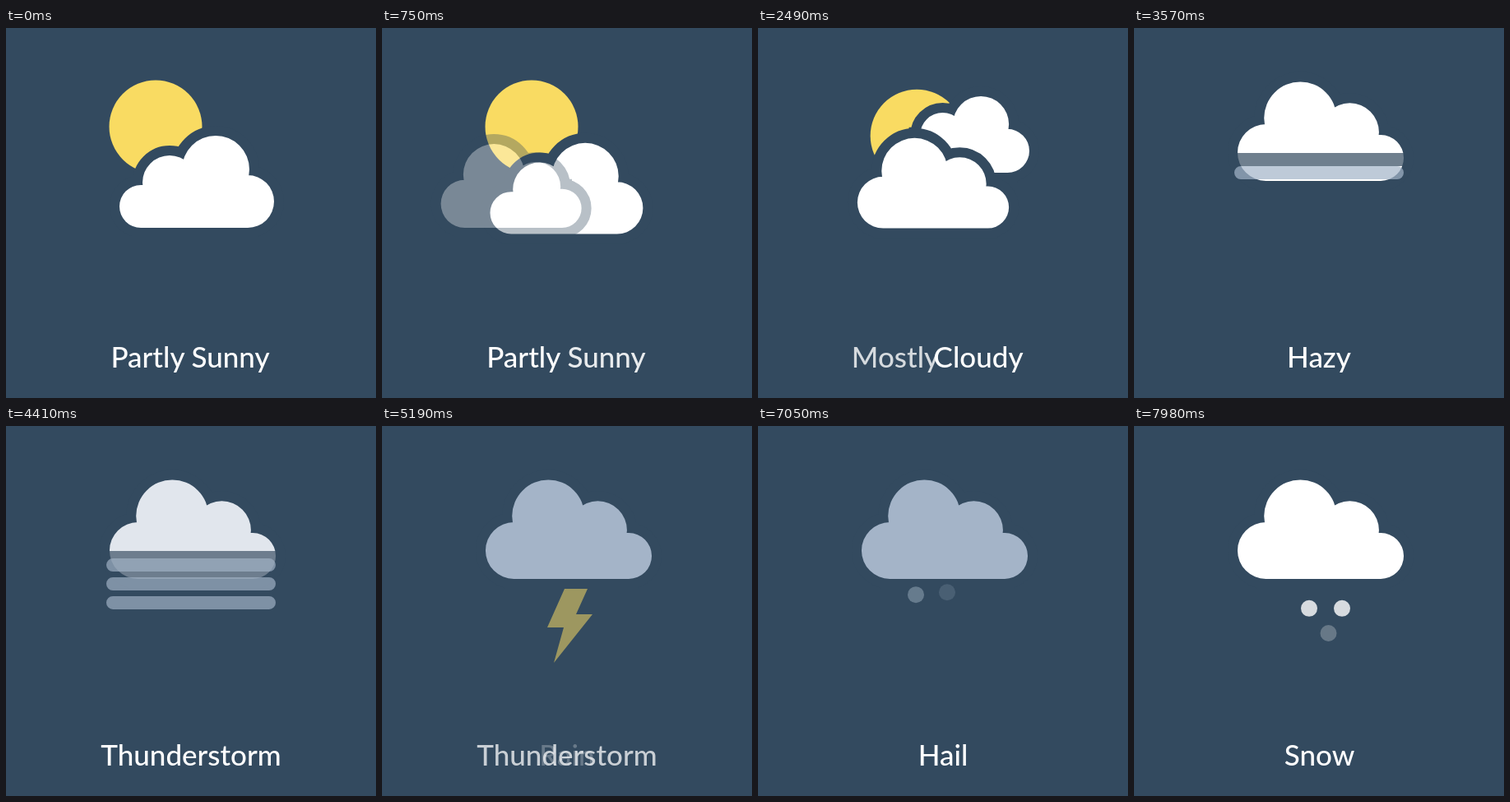
Recreate the animation shown at these times as an HTML page with a canvas. Size 450x450 px, loop 8000 ms.

```html
<!DOCTYPE html>
<html lang="en">
<head>
<meta charset="utf-8">
<title>Weather</title>
<style>
html, body { margin: 0; width: 100%; height: 100%; overflow: hidden; background: #334a5f; }
canvas { display: block; }
</style>
</head>
<body>
<canvas id="stage" width="450" height="450"></canvas>
<script>
const stage = document.getElementById('stage').getContext('2d');
const layer = stage.canvas.cloneNode().getContext('2d');
const LOOP = 8000, BG = '#334a5f', SUN = '#f9db62', RAIN = '#6bbbee';
const WHITE = [255, 255, 255], GREY = [164, 180, 200];

const ramp = (t, start, dur) => Math.min(1, Math.max(0, (t - start) / dur));
const cubic = p => p < .5 ? 4 * p ** 3 : 1 - 4 * (1 - p) ** 3;
const back = (p, s) => {
  const half = u => u * u * ((s + 1) * u - s) / 2;
  return p < .5 ? half(2 * p) : 1 - half(2 - 2 * p);
};
const mix = (from, to, p) => `rgb(${from.map((c, i) => Math.round(c + (to[i] - c) * p))})`;

function withAlpha(a, draw) {
  if (a <= 0) return;
  stage.save();
  stage.globalAlpha = a;
  draw();
  stage.restore();
}

function dot(x, y, r, color) {
  stage.fillStyle = color;
  stage.beginPath();
  stage.arc(x, y, r, 0, 7);
  stage.fill();
}

// Lobes are relative to the centre of the cloud.
const LOBES = [[-68, 30, 26], [-33, 1, 33], [23, -15, 41], [62, 24, 32]];

// Painted solid on its own layer, so that it fades as one piece.
function cloud(x, y, scale, flip, color, alpha) {
  layer.clearRect(0, 0, 450, 450);
  layer.save();
  layer.translate(x, y);
  layer.scale(flip ? -scale : scale, scale);
  layer.beginPath();
  for (const [cx, cy, r] of LOBES) {
    layer.moveTo(cx + r, cy);
    layer.arc(cx, cy, r, 0, 2 * Math.PI);
  }
  layer.rect(-68, 4, 130, 52);
  layer.strokeStyle = BG;
  layer.lineWidth = 24 / scale;
  layer.stroke();
  layer.fillStyle = color;
  layer.fill();
  layer.restore();
  withAlpha(alpha, () => stage.drawImage(layer.canvas, 0, 0));
}

function drawSky(t) {
  const join = ramp(t, 630, 600), slide = back(join, 5), size = cubic(join);
  const grow = cubic(ramp(t, 1500, 330));
  const lift = ramp(t, 3120, 450), rise = back(lift, 3.5), swell = cubic(lift);

  if (t < 2730) {
    const hide = 46 * back(ramp(t, 2280, 455), 5);
    dot(182 + hide, 120 + hide, 56.5, SUN);
  }
  if (lift < 1) {
    cloud(232 + 36 * slide - 16 * grow - 12 * swell,
      187 - 39 * slide - 18.5 * grow + 6 * swell,
      1 - .34 * size + .17 * grow - .33 * swell, false, '#fff', 1);
  }
  const darken = ramp(t, 4200, 630) - ramp(t, 7440, 450);
  cloud(205.5 - 40 * (1 - slide) + 7.5 * grow + 14 * rise,
    192 - 3.3 * grow - 63 * rise,
    .91 + .07 * grow + .095 * swell, true,
    mix(WHITE, GREY, darken), ramp(t, 630, 350));
}

function drawHaze(t) {
  const gone = ramp(t, 4200, 630);
  const open = cubic(ramp(t, 3570, 300)), pitch = 24 - 7 * cubic(gone);
  withAlpha(ramp(t, 3430, 200) - gone, () => {
    stage.fillStyle = BG;
    stage.fillRect(122, 152, 208, 16 + 20 * open);
    stage.fillStyle = mix(GREY, GREY, 0);
    stage.beginPath();
    for (let i = 0; i < 3; i++) {
      const y = 176 + (16 + (i - 1) * pitch) * open;
      stage.roundRect(122, y - 8, 206, 16, 8);
    }
    stage.fill();
  });
}

function drawBolt(t) {
  const show = ramp(t, 4530, 270);
  withAlpha(show - ramp(t, 5070, 260), () => {
    stage.beginPath();
    stage.rect(150, 198, 150, 94 * cubic(show));
    stage.clip();
    stage.fillStyle = SUN;
    stage.beginPath();
    [[222, 198], [250, 198], [236, 229], [256, 229], [209, 288], [221, 245], [201, 245]]
      .forEach(([x, y]) => stage.lineTo(x, y));
    stage.fill();
  });
}

function streak(t, x, start, end) {
  const show = ramp(t, start, 190), leave = ramp(t, end, 150);
  const dx = -12 * leave, dy = 22 * leave, len = cubic(show);
  withAlpha(show - leave, () => {
    stage.strokeStyle = RAIN;
    stage.lineWidth = 15;
    stage.lineCap = 'round';
    stage.beginPath();
    stage.moveTo(x + dx, 207 + dy);
    stage.lineTo(x + dx - 25.5 * len, 207 + dy + 46 * len);
    stage.stroke();
  });
}

function pellet(t, x, y, color, start, end, dur = 220) {
  const show = ramp(t, start, dur), leave = ramp(t, end, 180);
  withAlpha(show - leave, () =>
    dot(x - 10 * leave, y + 16 * show + 18 * leave, 10, color));
}

function drawFall(t) {
  for (let i = 0; i < 3; i++) streak(t, 186 + 39 * i, 5390 + 130 * i, 5880 + 125 * (2 - i));

  streak(t, 186, 6180, 6880);
  streak(t, 264, 6290, 6630);
  pellet(t, 220, 196, '#fff', 6220, 6780);
  pellet(t, 205, 230, '#fff', 6260, 6740);

  [[192, 200], [230, 200], [268, 200], [177, 230], [215, 230], [253, 230]]
    .forEach(([x, y], i) => pellet(t, x, y, '#d5e4f0', 6980 + 40 * i, 7440 + 30 * (5 - i)));

  pellet(t, 213, 209, '#fff', 7740, LOOP, 300);
  pellet(t, 253, 209, '#fff', 7740, LOOP, 300);
  pellet(t, 236.5, 248, '#fff', 7905, LOOP, 300);
}

// Text, centre, fade-in start and length, fade-out start and length.
const wordsAt = t => [
  ['Partly', 172.5 - 6 * cubic(ramp(t, 630, 600)), -999, 1, 1500, 330],
  ['Sunny', 273, -999, 1, 630, 400],
  ['Cloudy', 273 + 6 * cubic(ramp(t, 1500, 330)) - 54 * cubic(ramp(t, 2280, 570)), 730, 400, 3120, 300],
  ['Mostly', 167, 1500, 330, 2280, 570],
  ['Hazy', 225, 3120, 300, 4200, 200],
  ['Thunderstorm', 225, 4200, 210, 5070, 300],
  ['Rain', 225, 5070, 300, 5880, 300],
  ['Sleet', 225.5, 5880, 300, 6630, 300],
  ['Hail', 225, 6630, 300, 7440, 300],
  ['Snow', 225.5, 7440, 300, 9000, 1]
];

function drawLabel(t) {
  stage.font = '500 35px Lato, "Open Sans", sans-serif';
  stage.textAlign = 'center';
  for (const [text, x, start, inDur, end, outDur] of wordsAt(t)) {
    withAlpha(cubic(ramp(t, start, inDur)) - cubic(ramp(t, end, outDur)), () => {
      stage.fillStyle = '#fff';
      stage.fillText(text, x, 413);
    });
  }
}

function frame(now) {
  const t = now % LOOP;
  stage.fillStyle = BG;
  stage.fillRect(0, 0, 450, 450);
  drawSky(t);
  drawHaze(t);
  drawBolt(t);
  drawFall(t);
  drawLabel(t);
  requestAnimationFrame(frame);
}
requestAnimationFrame(frame);
</script>
</body>
</html>
```
